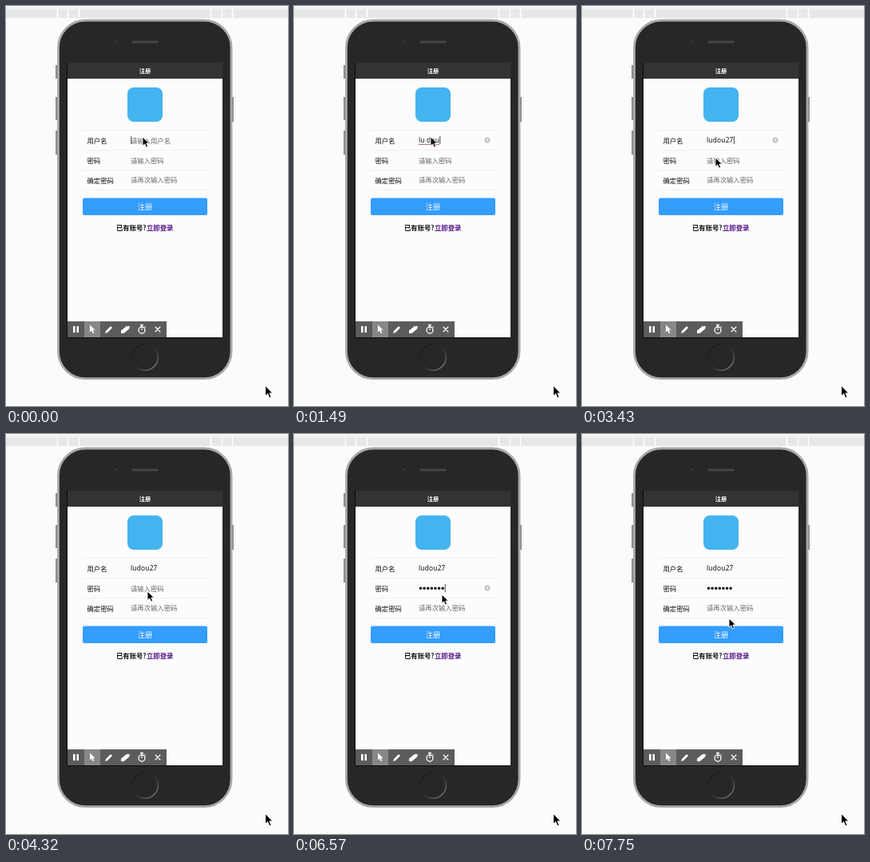
These frames come from a looping animation (353x501 px, 8 s). An HTML page:

```html
<!DOCTYPE html>
<html lang="zh-CN">
<head>
<meta charset="utf-8">
<title>注册</title>
<style>
html, body { margin: 0; width: 100%; height: 100%; overflow: hidden; background: #fbfbfb; }
svg { display: block; }
text { font: 8.35px 'Noto Sans CJK SC', 'Noto Sans CJK', sans-serif; fill: #111; }
.hint { fill: #6b6b6b; }
.bold { font-weight: bold; }
.light { fill: #fff; text-anchor: middle; }
#user { font-family: 'Noto Sans', sans-serif; letter-spacing: .2px; white-space: pre; }
</style>
</head>
<body>
<svg width="353" height="501" viewBox="0 0 353 501">
  <defs>
    <linearGradient id="ring" x1="0" y1="0" x2="1" y2="1">
      <stop offset=".2" stop-color="#1c1c1c"/><stop offset=".6" stop-color="#383838"/><stop offset="1" stop-color="#999"/>
    </linearGradient>
    <path id="arrow" d="M0 0V11.2L2.7 8.8 4.6 13 6.6 12.1 4.8 8H8.4Z"/>
    <g id="clear">
      <circle r="3.6" fill="#c4c4c4"/>
      <path d="M-1.3-1.3 1.3 1.3M1.3-1.3-1.3 1.3" stroke="#fff" stroke-width=".8"/>
    </g>
  </defs>

  <!-- ruler -->
  <path d="M0 2.5H353" stroke="#e2e2e2"/>
  <path d="M0 4H353V15H0Z" fill="#e7e7e7"/>
  <path d="M64.5 4V15M77.5 4V15M91.5 4V15M256.5 4V15M270.5 4V15M283.5 4V15" stroke="#fff" stroke-width="1.5"/>

  <!-- phone -->
  <path d="M63.5 74V91M63.5 114V143M63.5 156V186M283.5 114V145" stroke="#8c8c8c" stroke-width="3"/>
  <rect x="65.5" y="18" width="216.5" height="448.6" rx="34" fill="#272727" stroke="#a8a8a8" stroke-width="2.8"/>
  <rect x="157" y="43.5" width="34" height="3" rx="1.5" fill="#454545"/>
  <circle cx="138.5" cy="44.5" r="1.8" fill="#34344c"/>
  <circle cx="174" cy="440" r="16.3" fill="#262626" stroke="url(#ring)" stroke-width="1.3"/>
  <path d="M76 71H271V416H76Z" fill="#0c0c0c"/>
  <path d="M77 71H271V415H77Z" fill="#fcfcfc"/>
  <path d="M77 71H271V91H77Z" fill="#333"/>
  <text x="174" y="84" class="bold light" style="font-size:7.3px">注册</text>
  <rect x="152" y="102" width="44" height="43" rx="8" fill="#43b4ef"/>

  <!-- form -->
  <path d="M96 155.5H252M96 180.5H252M96 205.5H252M96 230.5H252" stroke="#f0f0f0"/>
  <text x="101.5" y="171.700">用户名</text>
  <text x="101.5" y="196.700">密码</text>
  <text x="101.5" y="221.500">确定密码</text>
  <text x="156" y="171.5" class="hint" id="userHint">请输入用户名</text>
  <text x="156" y="196.5" class="hint" id="passHint">请输入密码</text>
  <text x="156" y="221.3" class="hint">请再次输入密码</text>
  <text x="156" y="171.4" id="user"></text>
  <path id="underline" stroke="#96505a" stroke-width=".9"/>
  <path id="dots" stroke="#111" stroke-width="3.6" stroke-linecap="round" stroke-dasharray="0 4.6"/>
  <path id="caret" stroke="#333" stroke-width=".9"/>
  <use id="wipe" href="#clear"/>
  <rect x="96" y="240.500" width="156" height="21.500" rx="2" fill="#349dfe"/>
  <text x="174" y="254.700" class="light" style="font-size:9.2px">注册</text>
  <text x="138" y="281.400" class="bold">已有账号?<tspan x="176" fill="#551a8b">立即登录</tspan></text>

  <!-- recorder toolbar -->
  <path d="M77 395H201V415H77Z" fill="#5c5c5c"/>
  <path d="M98 395H118V415H98Z" fill="#878787"/>
  <g fill="#fff">
    <path d="M84 401H86.5V409H84ZM88.5 401H91V409H88.5Z"/>
    <use href="#arrow" transform="translate(105 399.5) scale(.8)"/>
    <path d="M124 410 125 407 131 401 133 403 127 409ZM144 406.5 151 401H155L154 404.5 147.5 410H144Z"/>
  </g>
  <g fill="none" stroke="#fff" stroke-width="1.3">
    <path d="M168 399.5H172M170 400V402M170 406V403.5M173.5 401.5 174.5 402.5M186.8 401.8 193.2 408.2M193.2 401.8 186.8 408.2"/>
    <circle cx="170" cy="406" r="4"/>
  </g>

  <g stroke="#fff" stroke-width=".9">
    <use href="#arrow" transform="translate(324.5 475) scale(1.15 1.25)"/>
    <use id="pointer" href="#arrow"/>
  </g>
</svg>
<script>
const LOOP = 8000, TICK = 148.8, LEFT = 156, PITCH = 4.6;
const [user, underline, dots, caret, wipe, pointer, userHint, passHint] =
  ['user', 'underline', 'dots', 'caret', 'wipe', 'pointer', 'userHint', 'passHint']
    .map(id => document.getElementById(id));

// Pointer stops: [tick, x, y]
const stops = [[20, 171, 164], [23, 167, 190], [26, 177, 197], [36, 177, 197],
  [37, 181, 194], [44, 185, 201], [52, 184, 231]];

const clamp = (v, lo, hi) => Math.min(hi, Math.max(lo, v));
// Keys pressed so far in a burst of `count`, one every `gap` ticks
const keys = (tick, start, gap, count) => clamp(Math.floor((tick - start) / gap) + 1, 0, count);
const show = (node, on) => node.setAttribute('visibility', on ? 'visible' : 'hidden');
const move = (node, x, y) => node.setAttribute('transform', `translate(${x} ${y})`);

function pointerAt(tick) {
  const next = clamp(stops.findIndex(([at]) => at > tick), 1, stops.length - 1);
  const [from, to] = tick >= stops.at(-1)[0] ? stops.slice(-2) : [stops[next - 1], stops[next]];
  const k = clamp((tick - from[0]) / (to[0] - from[0]), 0, 1);
  return [1, 2].map(i => from[i] + (to[i] - from[i]) * k);
}

function nameAt(tick) {
  const letters = 'ludou'.slice(0, keys(tick, 6, 1, 5));
  if (tick < 16) return letters.replace(/^lu(?=.)/, 'lu ');
  return letters + '27'.slice(0, keys(tick, 18, 3, 2));
}

function draw(tick) {
  const name = nameAt(tick);
  const count = keys(tick, 30, 1, 1) + keys(tick, 33, 1, 2) + keys(tick, 38, 2, 4);
  const row = (tick >= 26) + (tick >= 49);
  const y = 168 + 25 * row;

  user.textContent = name;
  const width = name ? user.getComputedTextLength() : 0;
  show(userHint, !name);
  show(passHint, !count);

  underline.setAttribute('d', `M${LEFT} 173.3h${width}`);
  show(underline, name && tick < 16);
  dots.setAttribute('d', `M158.5 193.3h${PITCH * (count - 1) + .1}`);
  show(dots, count);

  const caretX = LEFT + [width + .8, count && count * PITCH + 1, 0][row];
  const blinkedOff = (tick >= 1 && tick < 5) || tick === 29 || tick >= 52;
  caret.setAttribute('d', `M${caretX} ${y - 5}v10`);
  show(caret, !blinkedOff);
  move(wipe, 242, y);
  show(wipe, [name, count, 0][row]);
  move(pointer, ...pointerAt(tick));
}

function frame() {
  draw(Math.floor(performance.now() % LOOP / TICK));
  requestAnimationFrame(frame);
}
frame();
</script>
</body>
</html>
```
